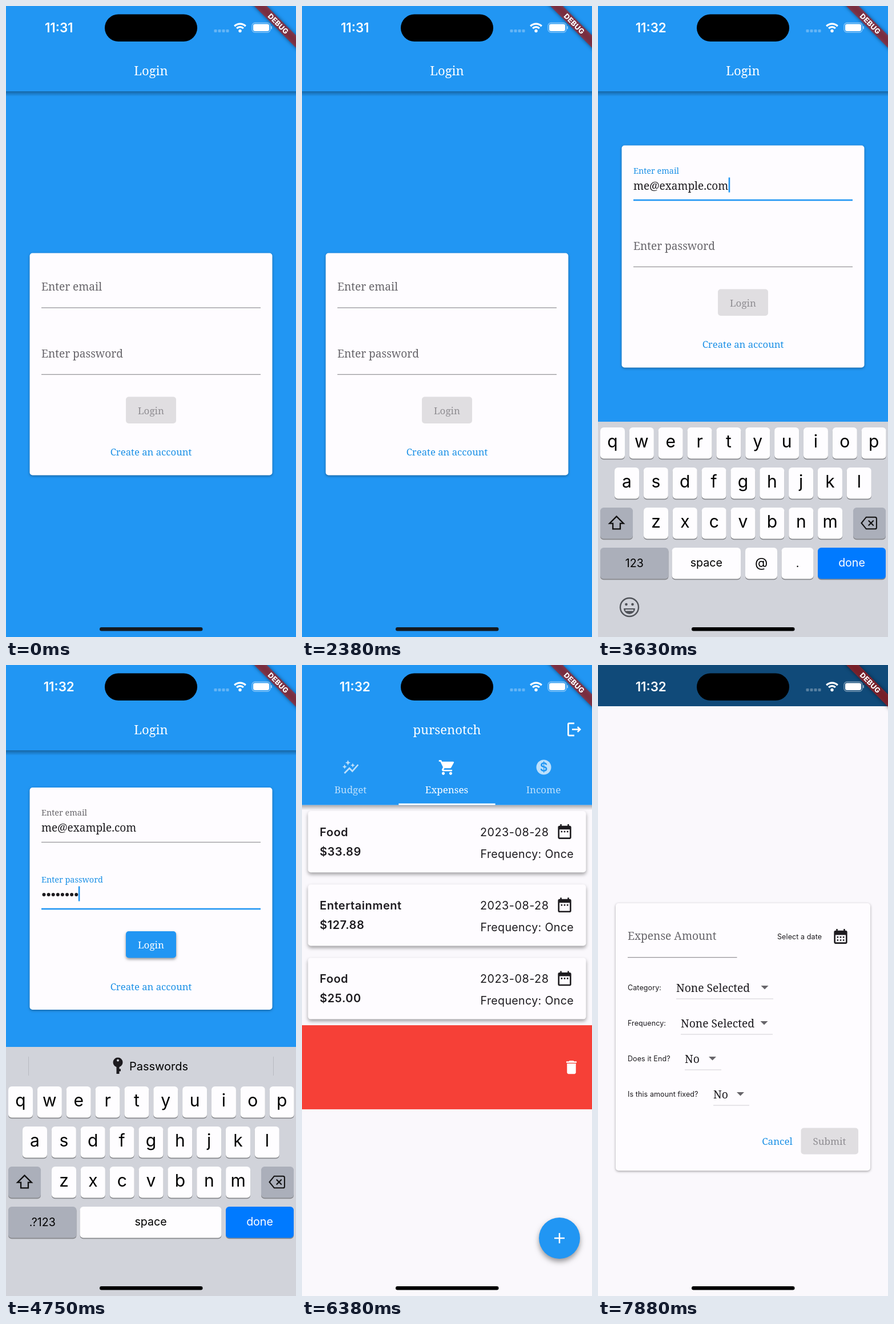
These frames come from a looping animation (508 px wide and 1102 px high, 8000 ms). An HTML page with a canvas:

```html
<!DOCTYPE html>
<html lang="en">
<head>
<meta charset="utf-8">
<title>Expense app walkthrough</title>
<style>
  html, body { margin: 0; width: 100%; height: 100%; overflow: hidden; background: #2196f3; }
  canvas { display: block; width: 508px; height: 1102px; }
</style>
</head>
<body>
<canvas id="stage"></canvas>
<script>
const W = 508, H = 1102, LOOP = 8000, STEP = 125;
const BLUE = '#2196f3', LINK = '#1b90e6', INK = '#1d1b1f', GREY = '#67656a', CARD = '#fefcff', PAGE = '#faf8fc';
const EMAIL = 'me@example.com';
const canvas = document.getElementById('stage');
const ctx = canvas.getContext('2d');
const ratio = window.devicePixelRatio || 1;
canvas.width = W * ratio;
canvas.height = H * ratio;

// Material icons on a 24 unit grid
const ICONS = {
  cart: 'M7 18c-1.1 0-2 .9-2 2s.9 2 2 2 2-.9 2-2-.9-2-2-2zM1 2v2h2l3.6 7.6-1.35 2.45C4.5 15.4 5.5 17 7 17h12v-2H7.4l1.1-2h7.45c.75 0 1.4-.4 1.75-1L21.3 5.5C21.7 4.8 21 4 20.4 4H5.2l-.93-2zM17 18c-1.1 0-2 .9-2 2s.9 2 2 2 2-.9 2-2-.9-2-2-2z',
  graph: 'M14.06 9.94L12 9l2.06-.94L15 6l.94 2.06L18 9l-2.06.94L15 12zM4 14l.94-2.06L7 11l-2.06-.94L4 8l-.94 2.06L1 11l2.06.94zM8.5 9l1.09-2.41L12 5.5 9.59 4.41 8.5 2 7.41 4.41 5 5.5l2.41 1.09zM4.5 20.5l6-6 4 4L23 8.93l-1.41-1.41-7.09 7.97-4-4L3 19z',
  logout: 'M17 8l-1.4 1.4 1.6 1.6H9v2h8.2l-1.6 1.6L17 16l4-4zM5 5h7V3H5c-1.1 0-2 .9-2 2v14c0 1.1.9 2 2 2h7v-2H5z',
  bin: 'M6 19c0 1.1.9 2 2 2h8c1.1 0 2-.9 2-2V7H6zM19 4h-3.5l-1-1h-5l-1 1H5v2h14z',
  date: 'M19 4h-1V2h-2v2H8V2H6v2H5c-1.1 0-2 .9-2 2v14c0 1.1.9 2 2 2h14c1.1 0 2-.9 2-2V6c0-1.1-.9-2-2-2zM19 20H5V9h14zM7 11h2v2H7zM11 11h2v2h-2zM15 11h2v2h-2z',
  month: 'M19 4h-1V2h-2v2H8V2H6v2H5c-1.1 0-2 .9-2 2v14c0 1.1.9 2 2 2h14c1.1 0 2-.9 2-2V6c0-1.1-.9-2-2-2zM19 20H5V10h14zM7 12h2v2H7zM11 12h2v2h-2zM15 12h2v2h-2zM7 16h2v2H7zM11 16h2v2h-2zM15 16h2v2h-2z',
  shift: 'M12 3L2.5 12.5H7V20h10v-7.500h4.500z',
  erase: 'M8 4h12q2 0 2 2v12q0 2-2 2H8l-6.500-8zM11 8.500l7 7M18 8.500l-7 7'
};
for (const name in ICONS) ICONS[name] = new Path2D(ICONS[name]);

const progress = (t, a, b) => Math.min(1, Math.max(0, (t - a) / (b - a)));
const ease = (t, a, b) => 1 - (1 - progress(t, a, b)) ** 3;
const smooth = (t, a, b) => { const p = progress(t, a, b); return p * p * (3 - 2 * p); };
const mix = (a, b, p) => a + (b - a) * p;

function shifted(x, y, draw) {
  ctx.save();
  ctx.translate(x, y);
  draw();
  ctx.restore();
}

function rect(x, y, w, h, color) {
  ctx.fillStyle = color;
  ctx.fillRect(x, y, w, h);
}

function box(x, y, w, h, r, color, shadow) {
  ctx.save();
  if (shadow) {
    ctx.shadowColor = `rgba(0,0,0,${shadow.alpha})`;
    ctx.shadowBlur = shadow.blur * ratio;
    ctx.shadowOffsetY = shadow.y * ratio;
  }
  ctx.fillStyle = color;
  ctx.beginPath();
  ctx.roundRect(x, y, w, h, r);
  ctx.fill();
  ctx.restore();
}

function line(points, color, width) {
  ctx.strokeStyle = color;
  ctx.lineWidth = width;
  ctx.beginPath();
  points.forEach(([x, y]) => ctx.lineTo(x, y));
  ctx.stroke();
}

function disc(x, y, r, color) {
  ctx.fillStyle = color;
  ctx.beginPath();
  ctx.arc(x, y, r, 0, 2 * Math.PI);
  ctx.fill();
}

function write(str, x, y, font, color, align, spacing = 0) {
  ctx.font = font;
  ctx.fillStyle = color;
  ctx.textAlign = align;
  ctx.letterSpacing = spacing + 'px';
  ctx.fillText(str, x, y);
}
const serif = (str, x, y, size, color, align = 'left') =>
  write(str, x, y, `${size}px "Noto Serif", serif`, color, align);
const sans = (str, x, y, size, color, align = 'left', weight = 400, spacing = 0) =>
  write(str, x, y, `${weight} ${size}px Inter, sans-serif`, color, align, spacing);

function icon(name, x, y, color, size = 31, stroke = 0) {
  shifted(x - size / 2, y - size / 2, () => {
    ctx.scale(size / 24, size / 24);
    ctx.fillStyle = ctx.strokeStyle = color;
    ctx.lineWidth = stroke;
    if (stroke) ctx.stroke(ICONS[name]);
    else ctx.fill(ICONS[name], 'evenodd');
  });
}

function appBar(bottom, title) {
  const shade = ctx.createLinearGradient(0, bottom, 0, bottom + 9);
  shade.addColorStop(0, 'rgba(0,0,0,.32)');
  shade.addColorStop(1, 'rgba(0,0,0,0)');
  rect(0, bottom, W, 9, shade);
  rect(0, 0, W, bottom, BLUE);
  serif(title, 254, 121, 22, '#fff', 'center');
}

function field(label, y, floating, focused) {
  serif(label, 62, y + 65.5 - 16.5 * floating, mix(19.1, 14.4, floating), focused ? LINK : GREY);
  const thick = focused ? 2.6 : 1.3;
  rect(62, y + 95.5 - thick / 2, 384, thick, focused ? BLUE : '#99979c');
}

function caret(x, y) {
  rect(x, y + 56, 2.6, 26, BLUE);
}

function formPage(title, action, y, form) {
  rect(0, 0, W, H, BLUE);
  appBar(149, title);
  box(41.5, y, 425, 388, 5, CARD, { alpha: .35, blur: 4, y: 1.5 });
  const second = y + 116.5;
  field('Enter email', y, form.emailFloat, form.focus === 'email');
  field('Enter password', second, form.passFloat, form.focus === 'pass');
  const typed = EMAIL.slice(0, form.letters);
  serif(typed, 62, y + 77, 19, INK);
  if (form.focus === 'email') caret(62.5 + ctx.measureText(typed).width, y);
  for (let i = 0; i < form.dots; i++) disc(66.5 + 8.1 * i, second + 70.5, 3, INK);
  if (form.focus === 'pass') caret(62 + 8.1 * form.dots, second);
  const ready = form.dots === 8;
  box(210, y + 251, 88, 46.5, 5, ready ? BLUE : '#e0dee1', ready && { alpha: .4, blur: 5, y: 2.5 });
  serif(action, 254, y + 281, 17, ready ? '#fff' : '#8f8d92', 'center');
}

function loginPage(y, form) {
  formPage('Login', 'Login', y, form);
  serif('Create an account', 254, y + 353.5, 16.7, LINK, 'center');
}

function signUpPage(form) {
  formPage('Create an account', 'Create', 431.5, form);
  line([[29, 103], [19, 113], [29, 123]], '#fff', 2.6);
}

const expenses = [
  { name: 'Food', amount: '$33.89', date: '2023-08-28', every: 'Once' },
  { name: 'Entertainment', amount: '$127.88', date: '2023-08-28', every: 'Once' },
  { name: 'Food', amount: '$25.00', date: '2023-08-28', every: 'Once', swipe: [6550, 6875], shrink: [6960, 7125] },
  { name: 'Housing', amount: '$1550.00', date: '2023-08-17', every: 'Monthly', note: 'Fixed amount: No',
    swipe: [5900, 6335], shrink: [6335, 6500] }
];

function expenseCard(item, h) {
  box(10.5, 10.5, 487, h - 21, 5, CARD, { alpha: .36, blur: 6, y: 3.5 });
  const lift = item.note ? 58 : 43, left = item.note ? 300 : 312;
  sans(item.name, 31, 54, 20, INK, 'left', 600, .55);
  sans(item.amount, 31, 88.5, 20, INK, 'left', 600, .55);
  if (item.note) sans(item.note, 31, 120.500, 19.6, INK, 'left', 400, .3);
  sans(item.date, left, lift + 11, 19.8, INK, 'left', 400, .5);
  icon('date', left + 148 - (item.note ? 3 : 0), lift + 3.5, INK);
  sans('Frequency: ' + item.every, 476, lift + 49, 19.6, INK, 'right', 400, .35);
}

function expenseList(t) {
  let y = 244.5;
  for (const item of expenses) {
    const full = item.note ? 156 : 128.2;
    const away = item.swipe ? smooth(t, ...item.swipe) : 0;
    const h = full * (1 - (item.shrink ? progress(t, ...item.shrink) ** 2 : 0));
    if (away > 0 && h > 0) shifted(0, y, () => {
      ctx.beginPath();
      ctx.rect(W * (1 - away), 0, W * away, h);
      ctx.clip();
      rect(0, 0, W, h, '#f64037');
      icon('bin', 472, h / 2, '#fff');
    });
    if (away < 1) shifted(-W * away, y, () => expenseCard(item, full));
    y += h;
  }
}

function homePage(t, snack) {
  const faded = 'rgba(255,255,255,.7)';
  rect(0, 0, W, H, PAGE);
  expenseList(t);
  appBar(244.5, 'pursenotch');
  icon('logout', 477, 112.5, '#fff', 32);
  icon('graph', 85, 179, faded);
  icon('cart', 254, 179, '#fff');
  disc(423.5, 178.5, 13, faded);
  sans('$', 423.5, 186, 21, BLUE, 'center', 600);
  serif('Budget', 85, 224, 17, faded, 'center');
  serif('Expenses', 253.5, 224, 17, '#fff', 'center');
  serif('Income', 423, 224, 17, faded, 'center');
  rect(169.3, 241.8, 169.3, 2.7, '#fff');

  const top = H - 102 * snack, y = Math.min(1001, top - 57);
  box(415, y - 36, 72, 72, 36, BLUE, { alpha: .4, blur: 10, y: 5 });
  line([[442, y], [460, y]], '#fff', 2.5);
  line([[451, y - 9], [451, y + 9]], '#fff', 2.5);
  rect(0, top, W, 102, '#323033');
  sans('Deleted Housing Expense', 31, top + 34.5, 17, '#f4eff4', 'left', 400, .35);
}

function key(x, y, w, label, { color = '#fefdff', ink = '#000', size = 19.6, drop = 32.5 } = {}) {
  box(x, y + 1.3, w, 55, 6, '#898a8e');
  box(x, y, w, 54.5, 6, color);
  sans(label, x + w / 2, y + drop, size, ink, 'center');
}

function keyboard(forPassword, bar) {
  const grey = '#abafba';
  rect(0, 726 - 59 * bar, W, 435, '#d1d3da');
  if (bar > 0) shifted(0, 59 * (1 - bar), () => {
    rect(39, 684, 1, 33, '#b8bac1');
    rect(468, 684, 1, 33, '#b8bac1');
    disc(196, 694, 8.5, INK);
    disc(196, 690.5, 2, '#d1d3da');
    line([[196, 700], [196, 714]], INK, 5);
    line([[196, 707.5], [201, 707.5]], INK, 4);
    sans('Passwords', 216, 708, 20, '#000');
  });
  [['qwertyuiop', 4], ['asdfghjkl', 29], ['zxcvbnm', 80]].forEach(([letters, left], row) =>
    [...letters].forEach((letter, i) =>
      key(left + 50.85 * i, 736 + 70 * row, 43, letter, { size: 30, drop: 35 })));
  key(4, 876, 57, '', { color: grey });
  key(447, 876, 57, '', { color: grey });
  icon('shift', 32.5, 903, '#111', 31, 1.8);
  icon('erase', 475, 903, '#111', 31, 1.6);
  key(4, 946, 119.5, forPassword ? '.?123' : '123', { color: grey, drop: 34 });
  key(129.5, 946, forPassword ? 248 : 120.5, 'space');
  if (!forPassword) {
    key(258, 946, 56, '@', { size: 23, drop: 34 });
    key(321.5, 946, 56, '.', { drop: 34 });
    smiley(55, 1050);
  }
  key(385, 946, 119, 'done', { color: '#007aff', ink: '#fff' });
}

function smiley(x, y) {
  const ink = '#505359';
  ctx.strokeStyle = ink;
  ctx.lineWidth = 2.4;
  ctx.beginPath();
  ctx.arc(x, y, 16, 0, 2 * Math.PI);
  ctx.stroke();
  disc(x - 5.5, y - 5, 2.3, ink);
  disc(x + 5.5, y - 5, 2.3, ink);
  ctx.beginPath();
  ctx.arc(x, y + 2, 10, 0, Math.PI);
  ctx.fill();
  rect(x - 7, y + 4, 14, 2.5, '#d1d3da');
}

function expenseSheet() {
  rect(0, 72, W, H, PAGE);
  box(31, 416, 446, 467, 5, CARD, { alpha: .35, blur: 4, y: 1.5 });
  serif('Expense Amount', 52, 480, 19.2, GREY);
  rect(52, 510, 191.5, 1.3, '#99979c');
  sans('Select a date', 314, 479, 12.5, INK, 'left', 400, .1);
  icon('month', 425, 474, INK);
  const rows = [
    ['Category:', 'None Selected', 137, 292, 307],
    ['Frequency:', 'None Selected', 145, 291, 306],
    ['Does it End?', 'No', 152, 200.5, 216],
    ['Is this amount fixed?', 'No', 202, 249.5, 265]
  ];
  rows.forEach(([label, value, left, arrow, right], i) => {
    const y = 563.5 + 62 * i;
    sans(label, 52, y + 4.5, 12.5, INK, 'left', 400, .1);
    serif(value, left, y + 7, 19.3, INK);
    ctx.fillStyle = GREY;
    ctx.beginPath();
    ctx.moveTo(arrow - 6.5, y - 3.5);
    ctx.lineTo(arrow + 6.5, y - 3.5);
    ctx.lineTo(arrow, y + 3);
    ctx.fill();
    rect(left, y + 19, right - left, 1, '#d2d0d4');
  });
  serif('Cancel', 314, 838, 17, LINK, 'center');
  box(355.5, 808.5, 100.5, 46, 5, '#e0dee1');
  serif('Submit', 405.5, 838, 17, '#8f8d92', 'center');
}

function debugBanner() {
  ctx.save();
  ctx.translate(W, 0);
  ctx.rotate(Math.PI / 4);
  ctx.filter = `blur(${3 * ratio}px)`;
  rect(-60, 36.2, 120, 15.5, 'rgba(0,0,0,.5)');
  ctx.filter = 'none';
  rect(-60, 36.2, 120, 15.5, 'rgba(183,28,28,.627)');
  sans('DEBUG', 0, 48.5, 12.6, '#fff', 'center', 800, .2);
  ctx.restore();
}

function statusBar(clock) {
  box(173, 14.5, 162, 47.5, 23.75, '#000');
  sans(clock, 92.7, 46, 22.3, '#fff', 'center', 600);
  for (let i = 0; i < 4; i++) box(364.5 + 7 * i, 41, 5, 5, 1.2, 'rgba(255,255,255,.3)');
  disc(410, 43.5, 2.7, '#fff');
  ctx.strokeStyle = '#fff';
  ctx.lineWidth = 3.3;
  for (const r of [8.3, 13.8]) {
    ctx.beginPath();
    ctx.arc(410, 45, r, -Math.PI * .75, -Math.PI * .25);
    ctx.stroke();
  }
  ctx.strokeStyle = 'rgba(255,255,255,.45)';
  ctx.lineWidth = 1.3;
  ctx.beginPath();
  ctx.roundRect(431, 29.5, 32, 16.5, 5);
  ctx.stroke();
  box(433, 31.5, 28, 12.5, 3.3, '#fff');
  box(464, 35, 2, 5.5, 1, 'rgba(255,255,255,.5)');
}

function render(t) {
  ctx.setTransform(ratio, 0, 0, ratio, 0, 0);
  ctx.clearRect(0, 0, W, H);

  const signUp = ease(t, 800, 1375) - smooth(t, 1500, 2375);
  const home = ease(t, 5150, 5750);
  const shown = ease(t, 2400, 2950) - ease(t, 5050, 5500);
  const bar = ease(t, 3700, 4000);
  const snack = ease(t, 6450, 6750);
  const sheet = ease(t, 7640, 7875);
  const keysHeight = 376 + 59 * bar;
  const form = {
    emailFloat: ease(t, 2400, 2650),
    passFloat: ease(t, 3650, 3900),
    focus: t < 2450 || t >= 5125 ? '' : t < 3700 ? 'email' : 'pass',
    letters: Math.floor(EMAIL.length * progress(t, 2900, 3600)),
    dots: Math.floor(8 * progress(t, 4125, 4750))
  };
  const empty = { emailFloat: 0, passFloat: 0, focus: '', letters: 0, dots: 0 };

  if (home < 1) shifted(-W / 3 * (signUp + home), 0, () => loginPage(431.5 - keysHeight * shown / 2, form));
  if (signUp > 0) shifted(W * (1 - signUp), 0, () => signUpPage(empty));
  if (home > 0) shifted(W * (1 - home), 0, () => homePage(t, snack));
  if (shown > 0) shifted(0, keysHeight * (1 - shown), () => keyboard(t >= 3700, bar));
  if (sheet > 0) {
    rect(0, 0, W, H, `rgba(0,0,0,${.5 * sheet})`);
    shifted(0, (H - 72) * (1 - sheet), expenseSheet);
  }
  debugBanner();
  statusBar(t < 2875 ? '11:31' : '11:32');
  const onDark = snack > .5 && sheet < .9;
  box(164, 1085, 180.5, 6.5, 3.25, onDark ? '#4f4e51' : t < 2500 ? '#14191f' : '#000');
}

function frame(now) {
  render(Math.floor(now % LOOP / STEP) * STEP);
  requestAnimationFrame(frame);
}
requestAnimationFrame(frame);
</script>
</body>
</html>
```
